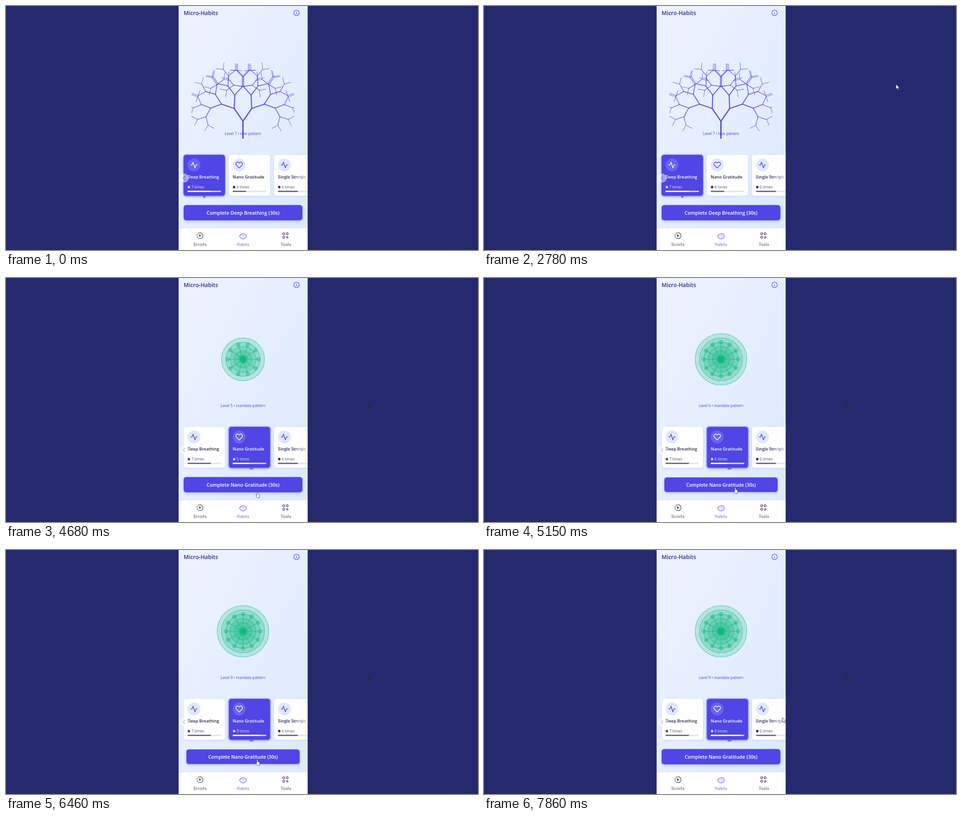
Recreate the animation shown at these times as an HTML page. Size 1039x539 px, loop 7.99 s.

```html
<!DOCTYPE html>
<html lang="en">
<head>
<meta charset="utf-8">
<title>Micro-Habits</title>
<style>
  html, body { margin: 0; width: 100%; height: 100%; overflow: hidden; background: #252a6e; }
  svg { display: block; }
  text { font-family: "Open Sans", "Noto Sans", sans-serif; }
  .title { font-size: 12.3px; font-weight: 600; fill: #312e81; }
  .level { font-size: 8.3px; font-weight: 500; fill: #4f46e5; text-anchor: middle; }
  .name { font-size: 9.3px; font-weight: 600; }
  .times { font-size: 8.25px; }
  .cta { font-size: 10.75px; font-weight: 600; fill: #fff; text-anchor: middle; }
  .nav text { font-family: Inter, sans-serif; font-size: 8.4px; font-weight: 500; letter-spacing: .35px; text-anchor: middle; }
  .line { fill: none; stroke-linecap: round; stroke-linejoin: round; }
  .soft { filter: drop-shadow(0 1.5px 1.8px rgba(30, 30, 90, .16)); }
  .deep { filter: drop-shadow(0 2.5px 3px rgba(30, 30, 90, .25)); }
</style>
</head>
<body>
<svg width="1039" height="539" viewBox="0 0 1039 539">
  <defs>
    <linearGradient id="sky" x1="0" y1="0" x2="1" y2="1">
      <stop offset="0" stop-color="#eef2ff"/>
      <stop offset="1" stop-color="#dbeafe"/>
    </linearGradient>
    <clipPath id="phone"><rect x="380" width="284" height="539"/></clipPath>
    <clipPath id="art"><rect x="408" y="66" width="227" height="227"/></clipPath>
  </defs>
  <rect width="1039" height="539" fill="#252a6e"/>
  <g clip-path="url(#phone)">
    <rect x="380" width="284" height="539" fill="url(#sky)"/>
    <text class="title" x="391" y="19.7">Micro-Habits</text>
    <g class="line" stroke="#4f46e5" stroke-width="1.2">
      <circle cx="639.6" cy="15" r="6"/>
      <path d="M639.6 17.6V14.8M639.6 12.4v.1"/>
    </g>
    <g id="tree" class="line" stroke="#4f46e5" clip-path="url(#art)"></g>
    <g id="mandala" fill="#10b981" stroke="#10b981"></g>
    <text id="level" class="level" x="521.7" y="285.4"></text>
    <g id="cards"></g>
    <g opacity=".5">
      <g fill="#fff"><circle cx="392" cy="380" r="10"/><circle cx="651" cy="380" r="10"/></g>
      <path class="line" stroke="#7771ea" stroke-width="1.3" d="M393.8 376.2L390.2 380l3.6 3.8M649.4 376.2l3.6 3.8l-3.6 3.8"/>
    </g>
    <g id="button">
      <rect class="deep" x="391" y="439.7" width="261.5" height="33.8" rx="5.7" fill="#4f46e5"/>
      <text id="cta" class="cta" x="521.8" y="460.9"></text>
    </g>
    <g class="nav">
      <rect x="380" y="490.5" width="284" height="49" fill="#fff"/>
      <rect x="380" y="490" width="284" height=".8" fill="#dfe3ee"/>
      <g class="line" stroke="#5b5878" stroke-width="1.5">
        <path d="M427 500.7a6.6 6.6 0 0 1 0 13.2"/>
        <path d="M427 500.7a6.6 6.6 0 0 0 0 13.2" stroke-dasharray="2.4 2.8" stroke-dashoffset="-2"/>
        <path d="M425.6 504.9v4.8l3.7-2.4z" fill="#5b5878" stroke-width="1"/>
        <rect x="609.2" y="501" width="4.2" height="4.2" rx="1.3"/>
        <rect x="616.8" y="501" width="4.2" height="4.2" rx="1.3"/>
        <rect x="609.2" y="508.8" width="4.2" height="4.2" rx="1.3"/>
        <path d="M618.9 508.4v5M616.4 510.9h5"/>
      </g>
      <g class="line" stroke="#7b73f2" stroke-width="1.3">
        <path d="M516.6 511.5c-3-.6-2.9-4.4-.4-5c0-2.500 2.600-3.300 4-2.200c1.300-2.300 4.400-1.900 5-.2c2.600-.4 3.700 1.700 2.900 3.200c2.500 1.200 1.800 4.400-.6 4.400c-.6 1.800-2.500 2-3.600 1.200c-.5 2.200-3.400 2.600-4.200.6c-1.500.6-3-.4-3.100-2z"/>
        <path d="M517.800 507.800c1.300-.6 2.400.2 2.300 1.500M521.300 505.400c.1 1.300.8 1.900 1.900 1.700M522.200 510.600c.3-1.400 1.700-1.800 2.700-.9M525.400 506.900l1 .8" stroke-width="1"/>
      </g>
      <text x="427" y="530" fill="#5b5878">Scrolls</text>
      <text x="521.9" y="530" fill="#7b73f2">Habits</text>
      <text x="616.3" y="530" fill="#5b5878">Tools</text>
    </g>
  </g>
  <path id="ghost" transform="translate(797.5 277)" fill="#2b2b35" d="M0 0V10.500L2.500 8.300L4.300 12.200L6 11.400L4.300 7.700H7.500Z"/>
  <g id="cursor" fill="#fff" stroke="#222" stroke-width=".7" stroke-linejoin="round">
    <path id="arrow" d="M0 0V10.500L2.500 8.300L4.300 12.200L6 11.400L4.300 7.700H7.500Z"/>
    <path id="hand" d="M3 8V1.600a1.100 1.100 0 0 1 2.200 0V5.500l3 .6q1.500.4 1.300 2L8.800 13.800H4L.5 9.200q.5-1.500 2.500.3Z"/>
  </g>
</svg>
<script>
const LOOP = 7990, SWITCH = 3390;
const $ = id => document.getElementById(id);
const show = (el, on) => el.setAttribute('opacity', +on);
const clamp = v => Math.max(0, Math.min(1, v));
const ease = v => { v = clamp(v); return v * v * (3 - 2 * v); };

const icons = {
  pulse: 'M22 12h-4l-3 9L9 3l-3 9H2',
  heart: 'M20.84 4.61a5.5 5.5 0 0 0-7.78 0L12 5.67l-1.06-1.06a5.5 5.5 0 0 0-7.78 7.78l1.06 1.06L12 21.23l7.78-7.78 1.06-1.06a5.5 5.5 0 0 0 0-7.78z'
};
const plain = { bg: '#fff', disc: '#e0e7ff', icon: '#4f46e5', name: '#24224d', times: '#4b5563', track: '#e5e7eb', bar: '#706c88' };
const active = { bg: '#4f46e5', disc: '#6764f0', icon: '#fff', name: '#fff', times: '#e0e7ff', track: '#d5d8fb', bar: '#fff', dot: '#c7cbfb' };

function card(id, x, label, icon, c, dot) {
  const on = c === active;
  return `<g id="${id}" transform="translate(${x} 328.700)">
    <rect class="${on ? 'deep' : 'soft'}" width="91" height="90.700" rx="5.700" fill="${c.bg}"/>
    ${on ? '<rect x="-.6" y="-.6" width="92.200" height="91.900" rx="6.200" fill="none" stroke="#979cf5" stroke-width="1.300"/>' : ''}
    <circle cx="22.800" cy="22.600" r="14.200" fill="${c.disc}"/>
    <path class="line" transform="translate(14.300 14.100) scale(.71)" d="${icons[icon]}" stroke="${c.icon}" stroke-width="2"/>
    <text class="name" x="8.600" y="52.700" fill="${c.name}">${label}</text>
    <circle cx="11.600" cy="71.400" r="2.800" fill="${dot || c.dot}"/>
    <text class="times" x="17" y="74.400" fill="${c.times}"></text>
    <rect x="8.500" y="79.400" width="74" height="2.800" rx="1.400" fill="${c.track}"/>
    <rect class="bar" x="8.500" y="79.400" height="2.800" rx="1.400" fill="${c.bar}"/>
  </g>`;
}
$('cards').innerHTML =
  card('breath', 391, 'Deep Breathing', 'pulse', plain, '#56535f') +
  card('thanks', 490.5, 'Nano Gratitude', 'heart', plain, '#36325f') +
  card('stretch', 590, 'Single Stretch', 'pulse', plain, '#36325f') +
  '<path id="tip" fill="#4f46e5"/>' +
  card('breathOn', 391, 'Deep Breathing', 'pulse', active) +
  card('thanksOn', 490.5, 'Nano Gratitude', 'heart', active);

function setCount(id, n, fill = n) {
  $(id).querySelector('.times').textContent = n + ' times';
  $(id).querySelector('.bar').setAttribute('width', 7.4 * fill);
}
setCount('breath', 7);
setCount('breathOn', 7);
setCount('stretch', 6);

// Branches shorten and spread wider with depth
const lengths = [38.5, 34, 29.5, 25.5, 21.8, 19.2, 14.6];
function branch(x, y, angle, depth) {
  if (depth === lengths.length) return '';
  const x2 = x + lengths[depth] * Math.sin(angle), y2 = y - lengths[depth] * Math.cos(angle);
  const spread = .6 + .04 * depth;
  return `<path d="M${x} ${y}L${x2} ${y2}" stroke-width="${2.9 - .26 * depth}" opacity="${1 - .065 * depth}"/>` +
    branch(x2, y2, angle - spread, depth + 1) + branch(x2, y2, angle + spread, depth + 1);
}
$('tree').innerHTML = branch(521.6, 293, 0, 0);

function mandala(level) {
  const n = Math.min(level, 6), cx = 521.7, cy = 179.6, k = .757, r = k * (20 + 5 * n);
  let out = '';
  for (let i = n; i > 0; i--)
    out += `<circle cx="${cx}" cy="${cy}" r="${k * 12.5 * i}" fill-opacity=".21" stroke-opacity=".55" stroke-width="1.300"/>`;
  for (let i = 0; i < 2 * n; i++) {
    const a = Math.PI * i / n, x = cx + r * Math.cos(a), y = cy + r * Math.sin(a);
    out += `<path d="M${cx} ${cy}L${x} ${y}" stroke-opacity=".6" stroke-width="1.300"/>
      <circle cx="${x}" cy="${y}" r="3.800" fill-opacity=".35" stroke-opacity=".7" stroke-width="1.200"/>`;
  }
  return out + `<circle cx="${cx}" cy="${cy}" r="7.600" stroke="none"/>`;
}

// time, x, y
const path = [
  [270, 832, 467], [340, 700, 405], [410, 584, 364], [760, 584, 364], [980, 508.5, 445],
  [1190, 508.5, 445], [1930, 564, 322], [2190, 564, 322], [2280, 610, 340], [2380, 693, 310],
  [2580, 693, 310], [2780, 907, 173], [2910, 907, 173], [3000, 798, 277], [3130, 600, 418],
  [3200, 510, 410], [3330, 550, 393], [3390, 550, 393], [3720, 560, 390.5], [4180, 546, 449],
  [4390, 546, 449], [4600, 549, 478], [4810, 549, 462], [6660, 549, 462], [6800, 962, 430],
  [7000, 962, 430], [7200, 1020, 503], [7450, 800, 440], [7660, 620, 366], [7730, 642, 362],
  [7820, 642, 362], [7860, 657, 370]
];
const presses = [4250, 5010, 5400, 5810, 6330];

function cursorAt(t) {
  const i = path.findIndex(p => p[0] > t);
  if (i < 0) return path[path.length - 1].slice(1);
  const [t0, x0, y0] = path[i - 1], [t1, x1, y1] = path[i], f = (t - t0) / (t1 - t0);
  return [x0 + (x1 - x0) * f, y0 + (y1 - y0) * f];
}

let shown;
function setLabels(switched, level) {
  const key = switched + '/' + level;
  if (key === shown) return;
  shown = key;
  $('level').textContent = switched ? `Level ${level} • mandala pattern` : 'Level 7 • tree pattern';
  $('cta').textContent = `Complete ${switched ? 'Nano Gratitude' : 'Deep Breathing'} (30s)`;
  $('mandala').innerHTML = mandala(level);
  $('tip').setAttribute('d', switched ? 'M536 418h8.600v4.600h-8.600z' : 'M430.500 418h12l-6 6.200z');
}

function render(t) {
  const switched = t >= SWITCH, on = ease((t - SWITCH) / 210);
  let level = 4, fill = 4, push = 0;
  for (const p of presses) {
    if (t >= p + 120) level++;
    fill += ease((t - p - 120) / 210);
    push += ease((t - p) / 110) - ease((t - p - 170) / 130);
  }
  setLabels(switched, level);
  setCount('thanks', level, fill);
  setCount('thanksOn', level, fill);
  show($('breathOn'), 1 - on);
  show($('thanksOn'), on);
  show($('tree'), !switched);
  show($('mandala'), on);
  $('button').setAttribute('transform', `translate(521.75 456.6) scale(${1 - .046 * push}) translate(-521.75 -456.6)`);

  show($('ghost'), t >= 3000);
  show($('cursor'), t >= 270);
  if (t < 270) return;
  const [x, y] = cursorAt(t), hand = x > 391 && x < 648 && y > 438 && y < 474;
  $('cursor').setAttribute('transform', `translate(${x} ${y})`);
  show($('hand'), hand);
  show($('arrow'), !hand);
}

const start = performance.now();
function tick() {
  render((performance.now() - start) % LOOP);
  requestAnimationFrame(tick);
}
tick();
</script>
</body>
</html>
```
